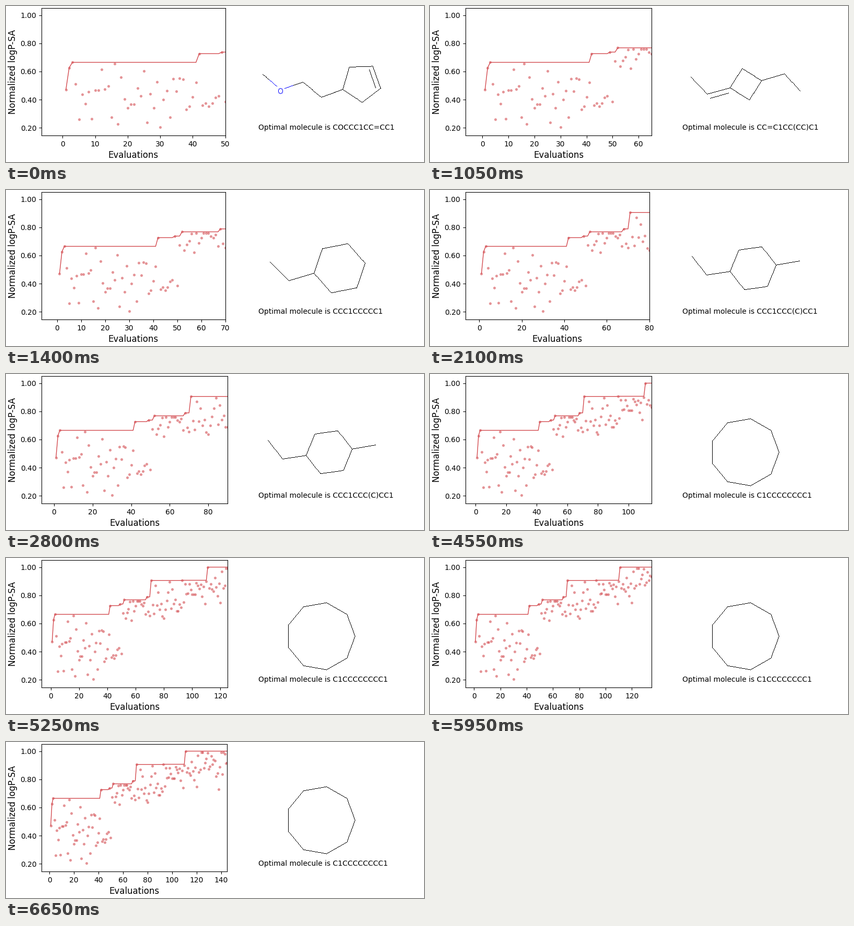
Write a matplotlib script that moves like this. It is 800 px wide and 300 px high and loops after 7 s.

```python
import numpy as np
import matplotlib.pyplot as plt
from matplotlib.animation import FuncAnimation

W, H, DPI = 800, 300, 100
LEFT, RIGHT, TOP, BOTTOM = 68, 424, 4, 249
X_MIN = -6.5
FIRST, STEP, FRAMES = 50, 5, 20
TOTAL = FIRST + STEP * (FRAMES - 1)
RED, BLACK, BLUE = "#d3494e", (0, 0, 0), (0, 0, 255)

# Evaluations that improved the best score
RECORDS = {1: 0.472, 2: 0.627, 3: 0.665, 42: 0.727, 49: 0.738,
           52: 0.768, 68: 0.789, 71: 0.905, 93: 0.907, 111: 1.0}


def make_scores():
    """A random search first, then a noisy climb below the best score."""
    rng = np.random.default_rng(4)
    n = np.arange(1, TOTAL + 1)
    records = np.zeros(TOTAL)
    records[np.array(list(RECORDS)) - 1] = list(RECORDS.values())
    best = np.maximum.accumulate(records)

    searching = n <= FIRST
    mean = np.where(searching, 0.44, 0.69 + 0.0024 * (n - FIRST))
    spread = np.where(searching, 0.11, 0.065)
    noisy = np.clip(rng.normal(mean, spread), 0.196, best - 0.01)
    return n, np.where(records > 0, records, noisy), best


def ring(cx, cy, r, sides, start=0.0, ry=None):
    a = np.radians(start) + np.linspace(0, 2 * np.pi, sides + 1)
    return list(zip(cx + r * np.cos(a), cy + (ry or r) * np.sin(a)))


def draw(strokes):
    """Rasterise one-pixel polylines on a white stage."""
    canvas = np.full((H, W, 3), 255, dtype=np.uint8)
    for points, color in strokes:
        for (x0, y0), (x1, y1) in zip(points, points[1:]):
            count = int(max(abs(x1 - x0), abs(y1 - y0))) + 2
            x = np.rint(np.linspace(x0, x1, count)).astype(int)
            y = np.rint(np.linspace(y0, y1, count)).astype(int)
            canvas[y, x] = color
    return canvas


def methoxy_ring():
    body = ring(680, 147, 38.1, 5, 160)
    return [([(491, 131), (504, 142)], BLACK),
            ([(504, 142), (518, 154)], BLUE),
            (ring(525, 163, 4, 24, ry=5), BLUE),
            ([(533, 158), (550, 152)], BLUE),
            ([(550, 152), (568, 146), (603, 175), body[0]], BLACK),
            (body, BLACK),
            ([(695, 122), (707, 157)], BLACK)]


def square_ring():
    body = ring(604, 150, 31, 4, 167)
    return [([(499, 136), (530, 169), body[0]], BLACK),
            ([(536, 177), (571, 167)], BLACK),
            (body, BLACK),
            ([body[2], (678, 130), (708, 163)], BLACK)]


def ethyl_ring():
    body = ring(638, 150, 50, 6, 169)
    return [([(505, 138), (541, 174), body[0]], BLACK), (body, BLACK)]


def methyl_ethyl_ring():
    body = ring(618, 150, 44.5, 6, 172)
    return [([(501, 127), (529, 163), body[0]], BLACK), (body, BLACK),
            ([body[3], (707, 136)], BLACK)]


def zigzag():
    return [([(506 + 39.2 * i, 156 + 2 * i - 23 * (i % 2))
              for i in range(6)], BLACK)]


def large_ring():
    return [(ring(602, 150, 65.5, 9), BLACK)]


# Evaluation that found each molecule, its formula and its picture
MOLECULES = [
    (49, "COCCC1CC=CC1", draw(methoxy_ring())),
    (52, "CC=C1CC(CC)C1", draw(square_ring())),
    (68, "CCC1CCCCC1", draw(ethyl_ring())),
    (71, "CCC1CCC(C)CC1", draw(methyl_ethyl_ring())),
    (93, "CCCCCC", draw(zigzag())),
    (111, "C1CCCCCCCC1", draw(large_ring())),
]

EVALS, SCORES, BEST = make_scores()
fig = plt.figure(figsize=(W / DPI, H / DPI), dpi=DPI, facecolor="white")

# Molecule panel, in stage pixels
panel = fig.add_axes([0, 0, 1, 1], zorder=-1)
panel.axis("off")
picture = panel.imshow(MOLECULES[0][2], extent=(0, W, H, 0), aspect="auto",
                       interpolation="nearest")
caption = panel.text(483, 238, "", fontsize=10, va="baseline")

# Score plot
ax = fig.add_axes([0.1, 0.2, 0.4, 0.7])
ax.set_ylim(0.1463, 1.05)
ax.set_xlabel("Evaluations", fontsize=12)
ax.set_ylabel("Normalized logP-SA", fontsize=12)
ax.yaxis.set_major_formatter("{x:.2f}")
dots = ax.scatter([], [], s=15, color=RED, alpha=0.6,
                  edgecolors="white", linewidths=0.4)
best_line, = ax.plot([], [], color=RED, lw=1)


def place_axes(count):
    """Narrow the plot by half of the last tick label's overhang."""
    step = 10 if count <= 70 else 20
    last = count // step * step
    x = LEFT + (last - X_MIN) / (count - X_MIN) * (RIGHT - LEFT)
    overhang = max(0, x + 4.4 * len(str(last)) - RIGHT)
    width = RIGHT - overhang / 2 - LEFT
    ax.set_position([LEFT / W, 1 - BOTTOM / H, width / W, (BOTTOM - TOP) / H])
    ax.set_xticks(range(0, count + 1, step))
    ax.set_xlim(X_MIN, count)


def update(frame):
    count = FIRST + STEP * frame
    place_axes(count)
    dots.set_offsets(np.column_stack([EVALS[:count], SCORES[:count]]))
    best_line.set_data(EVALS[:count], BEST[:count])

    _, formula, image = [m for m in MOLECULES if m[0] <= count][-1]
    picture.set_data(image)
    caption.set_text("Optimal molecule is " + formula)
    return []


anim = FuncAnimation(fig, update, frames=FRAMES, interval=350,
                     init_func=lambda: update(0), repeat=True,
                     repeat_delay=0, blit=False)
plt.show()
```
